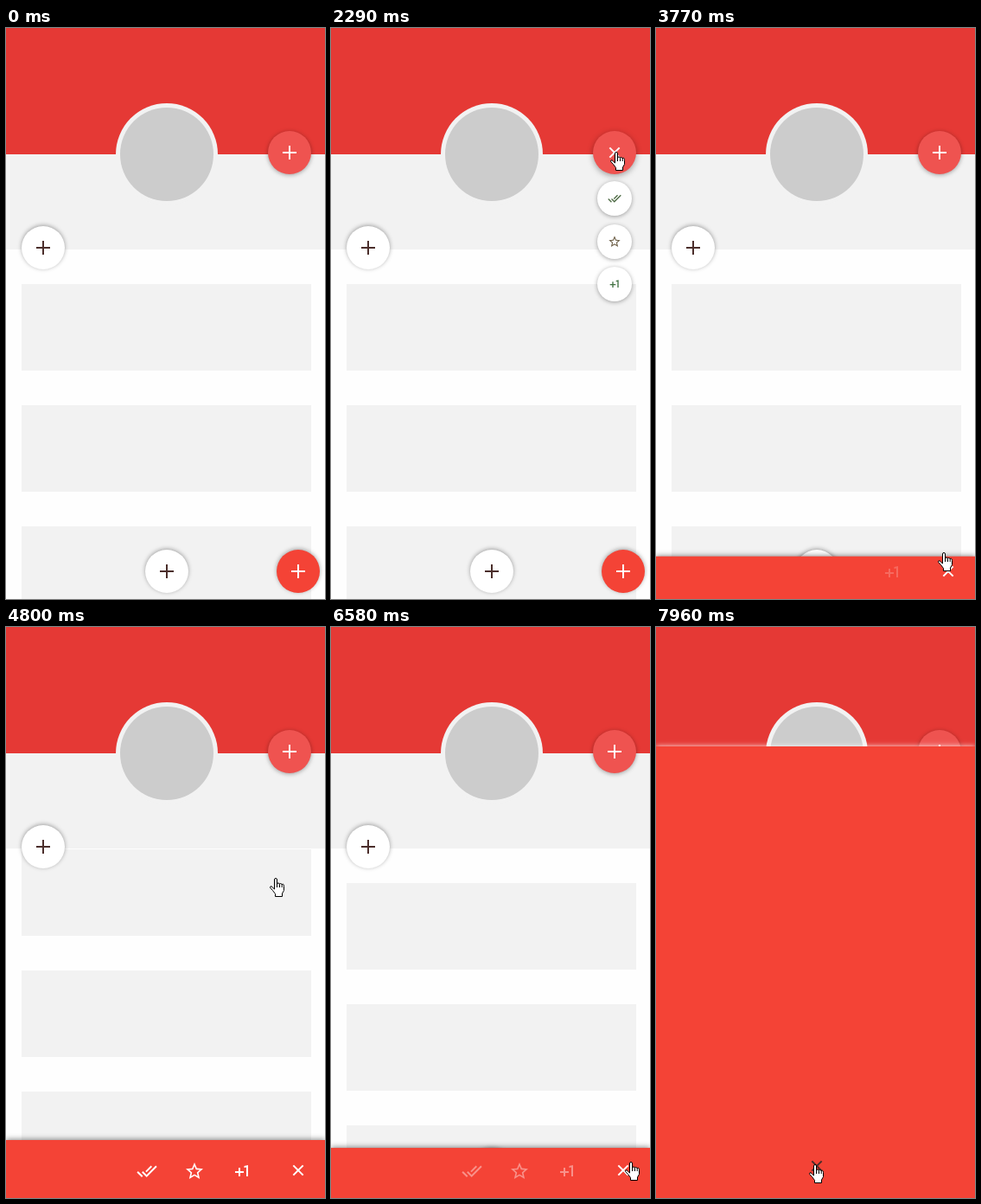
Recreate the animation shown at these times as an HTML page with a canvas. Size 369x660 px, loop 7.99 s.

```html
<!DOCTYPE html>
<html lang="en">
<head>
<meta charset="utf-8">
<title>Floating action buttons</title>
<style>
  html, body { margin: 0; width: 100%; height: 100%; overflow: hidden; background: #fefefe; }
  canvas { display: block; }
</style>
</head>
<body>
<canvas id="stage" width="369" height="660"></canvas>
<script>
const W = 369, H = 660, LOOP = 7990;
const ctx = document.getElementById('stage').getContext('2d');

const icons = {
  check: new Path2D('M18 7l-1.41-1.41-6.34 6.34 1.41 1.41L18 7zm4.24-1.41L11.66 16.17 7.48 12l-1.41 1.41L11.66 19l12-12-1.42-1.41zM.41 13.41L6 19l1.41-1.41L1.83 12 .41 13.41z'),
  star: new Path2D('M22 9.24l-7.19-.62L12 2 9.19 8.63 2 9.24l5.46 4.73L5.82 21 12 17.27 18.18 21l-1.63-7.03L22 9.24zM12 15.4l-3.76 2.27 1-4.28-3.32-2.88 4.38-.38L12 6.1l1.71 4.04 4.38.38-3.32 2.88 1 4.28L12 15.4z'),
  plusOne: new Path2D('M10 8H8v4H4v2h4v4h2v-4h4v-2h-4V8zm4.5-1.92V7.9l2.5-.5V18h2V5l-4.5 1.08z')
};
const hand = new Path2D('M5.5 13V2q0-1.5 1.5-1.5T8.5 2V7q0-1 1.5-1t1.5 1.5q0-1 1.2-1t1.5 1.5q0-.8 1.1-.8T16.5 9.5V14.5L14.5 18v3.5h-8V18.5L3.5 14.5.7 11.5Q.3 9.5 2 9.7L5.5 13Z');
const knuckles = new Path2D('M8.5 7v4M11.5 7.5v3.5M14.2 8v3');

// Pointer paths: [time, x, y]
const trips = [
  [[80, 349, 637], [330, 290, 400], [500, 280, 220], [690, 308, 96], [810, 323, 143],
   [2400, 323, 143], [2650, 330, 380], [2860, 320, 592], [2910, 320, 592], [3040, 328, 612],
   [3120, 326, 606], [4150, 326, 606], [4380, 308, 528], [4800, 305, 290], [4950, 304, 278],
   [5060, 300, 300], [5200, 293, 398], [5510, 266, 632]],
  [[5790, 349, 640], [6050, 340, 618], [6850, 340, 618], [7200, 168, 625], [7250, 156, 628],
   [7420, 156, 628], [7550, 177, 621], [LOOP, 177, 621]]
];

let t = 0;
const lin = (a, b) => Math.min(1, Math.max(0, (t - a) / (b - a)));
const smooth = (a, b) => { const p = lin(a, b); return p * p * (3 - 2 * p); };
const mix = (a, b, p) => a + (b - a) * p;

function shadow(color, blur, dy) {
  ctx.shadowColor = color;
  ctx.shadowBlur = blur;
  ctx.shadowOffsetY = dy;
}

function rect(x, y, w, h, color) {
  ctx.fillStyle = color;
  ctx.fillRect(x, y, w, h);
}

function disc(x, y, r, color, dy, blur = 5) {
  if (r <= 0) return;
  ctx.save();
  if (dy) shadow('rgba(0,0,0,.35)', blur, dy);
  ctx.fillStyle = color;
  ctx.beginPath();
  ctx.arc(x, y, r, 0, 7);
  ctx.fill();
  ctx.restore();
}

function plus(x, y, color, turn = 0, alpha = 1) {
  ctx.save();
  ctx.globalAlpha = alpha;
  ctx.translate(x, y);
  ctx.rotate(turn * Math.PI / 4);
  rect(-8, -1, 16, 2, color);
  rect(-1, -8, 2, 16, color);
  ctx.restore();
}

function icon(name, x, y, scale, color, alpha = 1) {
  ctx.save();
  ctx.globalAlpha = alpha;
  ctx.translate(x, y);
  ctx.scale(scale, scale);
  ctx.translate(-12, -12);
  ctx.fillStyle = color;
  ctx.fill(icons[name]);
  ctx.restore();
}

function drawPage() {
  const scroll = 39 * (smooth(4550, 4790) - smooth(4930, 5150));
  rect(0, 0, W, H, '#fefefe');
  for (let i = 0; i < 4; i++) rect(18, Math.round(296 + 140 * i - scroll), 335, 100, '#f2f2f2');
  rect(0, 146, W, 110, '#f2f2f2');
  rect(0, 0, W, 146, '#e53935');
  disc(186, 146, 59, '#f2f2f2');
  disc(186, 146, 54, '#ccc');
  disc(43, 254, 25, '#fff', -1);
  plus(43, 254, '#4b2e2b');
}

function drawMenu() {
  const items = [['check', 197, '#4e6b45'], ['star', 247, '#6b5d45'], ['plusOne', 296, '#3f7040']];
  items.forEach(([name, y, color], i) => {
    const out = 2310 + (2 - i) * 60;
    const s = smooth(1250 + i * 100, 1570 + i * 100) - smooth(out, out + 200);
    disc(328, y, 20 * s, '#fff', 1);
    icon(name, 328, y, s * 2 / 3, color);
  });
  const open = smooth(1150, 1400) - smooth(2310, 2510);
  disc(328, 144, 25, '#ef5350', 1 + open, 5 + 2 * open);
  plus(328, 144, '#fff', open);
}

function drawToolbar() {
  const rise = 1 - (1 - lin(3635, 3915)) ** 2 - lin(6500, 6720) ** 2;
  const shrink = smooth(3590, 3740) - smooth(6600, 6800);
  disc(338, 628, 25 * (1 - shrink), '#f44336', -1);
  if (rise > 0) {
    ctx.save();
    shadow('rgba(0,0,0,.45)', 6, -1);
    rect(0, 660 - 67 * rise, W, 80, '#f44336');
    ctx.restore();
    const fade = 1 - lin(6500, 6640);
    ['plusOne', 'star', 'check'].forEach((name, i) =>
      icon(name, 273 - 55 * i, 629, 1, '#fff', fade * lin(3740 + 50 * i, 3890 + 50 * i)));
  }
  plus(338, 628, '#fff', smooth(3600, 3760) - smooth(6600, 6800));
}

function drawSheet() {
  const grow = smooth(7760, 7820), spread = lin(7885, 7960);
  const r = mix(25, 40, grow), cy = mix(628, 623, grow);
  const left = mix(186 - r, 0, spread), top = mix(cy - r, 138, spread);
  const tint = mix(0.12 * grow, 1, Math.min(1, spread * 1.5));
  ctx.save();
  if (spread) shadow('rgba(255,255,255,.9)', 6, 0);
  else shadow('rgba(0,0,0,.35)', 5, -1);
  ctx.fillStyle = `rgb(${mix(255, 244, tint)},${mix(255, 67, tint)},${mix(255, 54, tint)})`;
  ctx.beginPath();
  ctx.roundRect(left, top, mix(2 * r, W, spread), cy + r - top, r * (1 - spread));
  ctx.fill();
  ctx.restore();
  plus(186, cy, '#4b2e2b', smooth(7760, 7900), 1 - grow + spread);
}

function drawPointer() {
  const path = trips.find(p => t >= p[0][0] && t < p[p.length - 1][0]);
  if (!path) return;
  const i = path.findIndex(k => k[0] > t) - 1;
  const a = path[i], b = path[i + 1], span = b[0] - a[0], p = (t - a[0]) / span;
  // Smooth through moving points, standing still at rests
  const slope = (j, c) => {
    const u = path[j - 1], k = path[j], v = path[j + 1];
    if (!u || !v || (k[c] - u[c]) * (v[c] - k[c]) <= 0) return 0;
    return (v[c] - u[c]) / (v[0] - u[0]);
  };
  const at = c => mix(a[c], b[c], p * p * (3 - 2 * p))
    + span * p * (1 - p) * ((1 - p) * slope(i, c) - p * slope(i + 1, c));
  ctx.save();
  ctx.translate(Math.round(at(1)), Math.round(at(2)));
  ctx.fillStyle = '#fff';
  ctx.strokeStyle = '#000';
  ctx.fill(hand);
  ctx.stroke(hand);
  ctx.stroke(knuckles);
  ctx.restore();
}

function draw() {
  t = performance.now() % LOOP;
  drawPage();
  drawMenu();
  const layers = [drawSheet, drawToolbar];
  if (t > 7700) layers.reverse();
  layers.forEach(layer => layer());
  drawPointer();
  requestAnimationFrame(draw);
}
draw();
</script>
</body>
</html>
```
